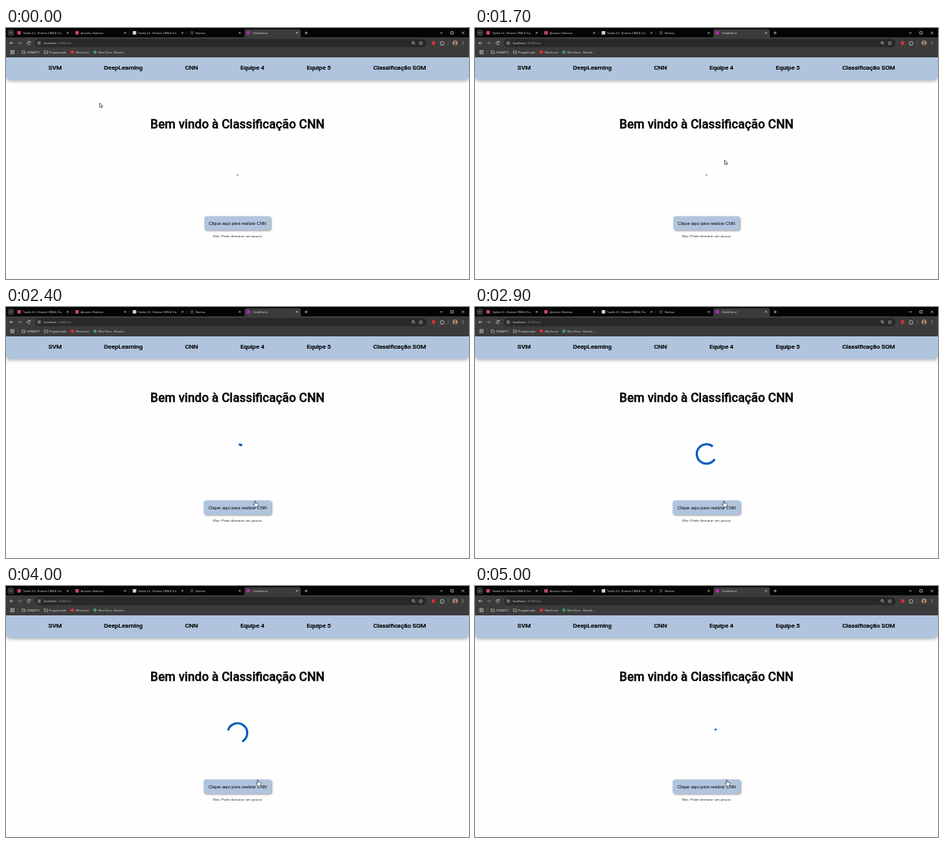
An HTML page that plays this animation: 600x325 px, repeating every 5100 ms.

```html
<!DOCTYPE html>
<html lang="pt">
<head>
<meta charset="utf-8">
<title>Classificação CNN</title>
<style>
  html, body { margin: 0; width: 100%; height: 100%; overflow: hidden; background: #fefefe; }
  svg { display: block; width: 100vw; height: 100vh; }
  .ui { font: 3.6px "Open Sans", "Noto Sans", sans-serif; fill: #dedede; }
  .nav { font: 500 8.1px Roboto, sans-serif; stroke: #000; stroke-width: .2; }
  .title { font: 500 16px Roboto, sans-serif; stroke: #000; stroke-width: .35; text-anchor: middle; }
  .label { font: 5.6px "Liberation Sans", Arial, sans-serif; text-anchor: middle; }
  .note { font: 4.4px Roboto, sans-serif; letter-spacing: .2px; text-anchor: middle; fill: #222; }
  .line { fill: none; stroke: #d6d6d6; stroke-width: .7; }
  #bar { filter: drop-shadow(0 2px 2px rgba(40, 55, 80, .38)); }
  #face { filter: drop-shadow(1px 1.5px 1.2px rgba(0, 0, 0, .4)); }
</style>
</head>
<body>
<svg viewBox="0 0 600 325" preserveAspectRatio="none">
  <rect width="600" height="325" fill="#fefefe"/>

  <path id="bar" d="M0 38H600V61Q600 67 594 67H6Q0 67 0 61Z" fill="#b0c4de"/>
  <g id="nav" class="nav"></g>

  <text id="title" class="title" x="300" y="130">Bem vindo à Classificação CNN</text>
  <path id="dash" d="M299 190.3H301.2" stroke="#333" stroke-width=".8"/>
  <path id="spinner" fill="none" stroke="#005cbb" stroke-width="2.8"/>
  <g id="button">
    <rect id="face" x="-43" y="-9" width="86" height="18" rx="3.2" fill="#b0c4de"/>
    <text id="label" class="label" y="2">Clique aqui para realizar CNN</text>
  </g>
  <text id="note" class="note" x="300" y="270.8">Obs: Pode demorar um pouco</text>

  <g id="chrome">
    <rect width="600" height="13" fill="#040404"/>
    <rect y="12" width="600" height="26" fill="#3b3b3b"/>
    <path d="M306 12.5Q309 12.5 309 9.5V4Q309 1.5 311.5 1.5H379.5Q382 1.5 382 4V9.5Q382 12.5 385 12.5Z" fill="#3b3b3b"/>
    <rect x="2" y="2" width="8.5" height="8.5" rx="2.5" fill="#303030"/>
    <path class="line" d="M5 5.7L6.3 7L7.6 5.7M387 6.3H391M389 4.3V8.3M562.5 6.3H566M576.5 4.7H579.7V7.9H576.5ZM590.5 4.7L593.7 7.9M593.7 4.7L590.5 7.9"/>
    <rect x="37.5" y="14.3" width="507.5" height="10.4" rx="5.2" fill="#282828"/>
    <path class="line" d="M9.5 19.5H5M7 17.5L5 19.5L7 21.5"/>
    <path class="line" d="M15.5 19.5H20M18 17.5L20 19.5L18 21.5" style="stroke:#8a8a8a"/>
    <path class="line" d="M31.2 18.5A2 2 0 1 0 31.4 20.2M31.4 17V18.7H29.7"/>
    <circle cx="43" cy="19.5" r="3.3" fill="#3d3d3d"/>
    <path class="line" d="M41.5 18.5H44.5M41.5 20.5H44.5"/>
    <circle class="line" cx="527.6" cy="19" r="1.5"/>
    <path class="line" d="M528.7 20.1L530.2 21.6"/>
    <path class="line" d="M537.5 17.2L538.2 18.8L539.9 18.9L538.6 20L539 21.7L537.5 20.8L536 21.7L536.4 20L535.1 18.9L536.8 18.8Z" style="stroke-width:.5"/>
    <rect x="552" y="17.2" width="4" height="4.6" rx=".5" fill="#d92c3a"/>
    <path class="line" d="M563.2 18H564.3A.9 .9 0 0 1 566 18H567V19.3A.9 .9 0 0 1 567 21V22H563.2Z"/>
    <path d="M573.3 16.5V22.5" stroke="#686868" stroke-width=".6"/>
    <circle cx="582" cy="19.5" r="3.3" fill="#b08d78"/>
    <circle cx="582" cy="18.6" r="1.2" fill="#54423c"/>
    <path d="M579.8 21.9Q582 18.8 584.2 21.9Q582 23.4 579.8 21.9Z" fill="#54423c"/>
    <path d="M592 17.4V18.2M592 19.1V19.9M592 20.8V21.6" stroke="#ddd" stroke-width=".9"/>
    <path class="line" d="M6 29H7.7V30.7H6ZM8.8 29H10.5V30.7H8.8ZM6 31.8H7.7V33.5H6ZM8.8 31.8H10.5V33.5H8.8Z" style="stroke-width:.6"/>
    <path d="M15.3 28V34" stroke="#686868" stroke-width=".5"/>
    <path class="line" d="M20.8 29.5H22.3L22.9 30.2H25V33H20.8ZM49.8 29.5H51.3L51.9 30.2H54V33H49.8Z" style="stroke-width:.6"/>
    <g id="ui" class="ui"></g>
  </g>

  <path id="arrow" d="M0 0V5.6L1.3 4.5L2.1 6.4L3 6L2.2 4.2H4Z" fill="#fff" stroke="#111" stroke-width=".6"/>
  <path id="hand" d="M2 .5Q2.9 .2 3 1.1V3.4Q4.6 3.3 6.2 4.1Q6.8 4.4 6.5 6L5.9 8.4H2.7L.5 5.5Q.3 4.6 1.2 4.7L2 5.3Z" fill="#fff" stroke="#222" stroke-width=".6"/>
</svg>
<script>
const $ = id => document.getElementById(id);
const LOOP = 5100, STEP = 100;
const CLICK = 2400, SPIN_START = 2319;

function add(parent, tag, attrs, text) {
  const el = document.createElementNS(parent.namespaceURI, tag);
  for (const key in attrs) el.setAttribute(key, attrs[key]);
  if (text) el.textContent = text;
  parent.append(el);
}

const menu = [["SVM", 55], ["DeepLearning", 127], ["CNN", 232], ["Equipe 4", 303.7], ["Equipe 5", 389.7], ["Classificação SOM", 476]];
for (const [text, x] of menu) add($("nav"), "text", { x, y: 54.2 }, text);

const tabs = [
  ["Tarefa 2.6 - Roteiro CNN & Tra", 22, 17, "#c9485e"],
  ["Assunto: Roteiros", 97, 92, "#c9485e"],
  ["Tarefa 2.6 - Roteiro CNN & Tra", 171, 166.5, "#d5d5d5"],
  ["Ramiva", 246, 241, "#303438"],
  ["OndaPainel", 320, 314, "#a52fa8"]
];
tabs.forEach(([text, x, dot, fill], i) => {
  const cross = 80 + 74.3 * i;
  add($("ui"), "rect", { x: dot - 2.3, y: 4, width: 4.6, height: 4.6, rx: .6, fill });
  add($("ui"), "text", { x, y: 7.6 }, text);
  add($("ui"), "path", { class: "line", d: `M${cross - 1.2} 5.1l2.4 2.4m0 -2.4l-2.4 2.4` });
  if (i < 3) add($("ui"), "path", { d: `M${cross + 5.5} 4v5`, stroke: "#444", "stroke-width": .5 });
});

const marks = [["ZENARTO", 27.5], ["Programação", 56], ["MeuCurso", 90.5], ["Meu Disco - Nuvelo...", 119.5]];
for (const [text, x] of marks) add($("ui"), "text", { x, y: 32.5 }, text);
add($("ui"), "circle", { cx: 86, cy: 31.2, r: 2.3, fill: "#d92f3d" });
add($("ui"), "circle", { cx: 115.3, cy: 31.2, r: 2.2, fill: "#3f9b62" });
add($("ui"), "text", { x: 49, y: 20.9, style: "font-size:4px" }, "localhost");
add($("ui"), "text", { x: 67.2, y: 20.9, style: "font-size:4px;fill:#959595" }, ":4200/cnn");

// Pointer stops: time, x, y
const route = [
  [0, 121.5, 97], [500, 185, 92], [600, 185, 92], [900, 262, 84], [1000, 262, 84],
  [1600, 381, 108], [1700, 323.5, 171], [2100, 320.3, 250.5], [2900, 320, 250.5],
  [3500, 322.8, 250.5], [3900, 323.8, 250.5], [LOOP, 323.8, 250.5]
];

function pointer(t) {
  const i = route.findIndex(stop => stop[0] > t);
  const [t0, x0, y0] = route[i - 1], [t1, x1, y1] = route[i];
  const k = (t - t0) / (t1 - t0);
  return [x0 + (x1 - x0) * k, y0 + (y1 - y0) * k];
}

// cubic-bezier(.4, 0, .2, 1)
function ease(x) {
  let lo = 0, hi = 1;
  for (let i = 0; i < 24; i++) {
    const u = (lo + hi) / 2, v = 1 - u;
    if (1.2 * v * v * u + .6 * v * u * u + u ** 3 < x) lo = u; else hi = u;
  }
  return 3 * (1 - lo) * lo * lo + lo ** 3;
}

// Indeterminate spinner: steady turn plus eased eighths, arc of 10 to 280 degrees
function arc(s) {
  const half = s / 666.5, n = Math.floor(half), e = ease(half - n);
  const mid = -96 + 360 * s / 1568.235 + 135 * (n + e);
  const reach = 5 + 135 * (n % 2 ? 1 - e : e);
  const at = deg => {
    const a = deg * Math.PI / 180;
    return `${300 + 12.6 * Math.cos(a)} ${190.3 + 12.6 * Math.sin(a)}`;
  };
  return `M${at(mid - reach)}A12.6 12.6 0 ${reach > 90 ? 1 : 0} 1 ${at(mid + reach)}`;
}

const show = (id, on) => $(id).setAttribute("visibility", on ? "visible" : "hidden");

function draw(t) {
  const busy = t >= CLICK, over = t >= 2100, lit = over && !busy;
  const shift = busy ? 7 : 0;
  const [x, y] = pointer(t);

  $("title").setAttribute("y", 130 - shift);
  $("note").setAttribute("y", 270.8 + shift);
  $("button").setAttribute("transform", `translate(300 ${252.7 + shift}) scale(${over ? 1.02 : 1})`);
  $("face").setAttribute("fill", lit ? "#bdd0e9" : "#b0c4de");
  $("label").setAttribute("fill", lit ? "#333a44" : "#000");

  show("dash", !busy);
  show("spinner", busy);
  if (busy) $("spinner").setAttribute("d", arc(t - SPIN_START));

  show("arrow", !over);
  show("hand", over);
  $(over ? "hand" : "arrow").setAttribute("transform", `translate(${x} ${y})`);
}

const start = performance.now();
function tick() {
  const t = (performance.now() - start) % LOOP;
  draw(Math.floor(t / STEP) * STEP);
  requestAnimationFrame(tick);
}
tick();
</script>
</body>
</html>
```
